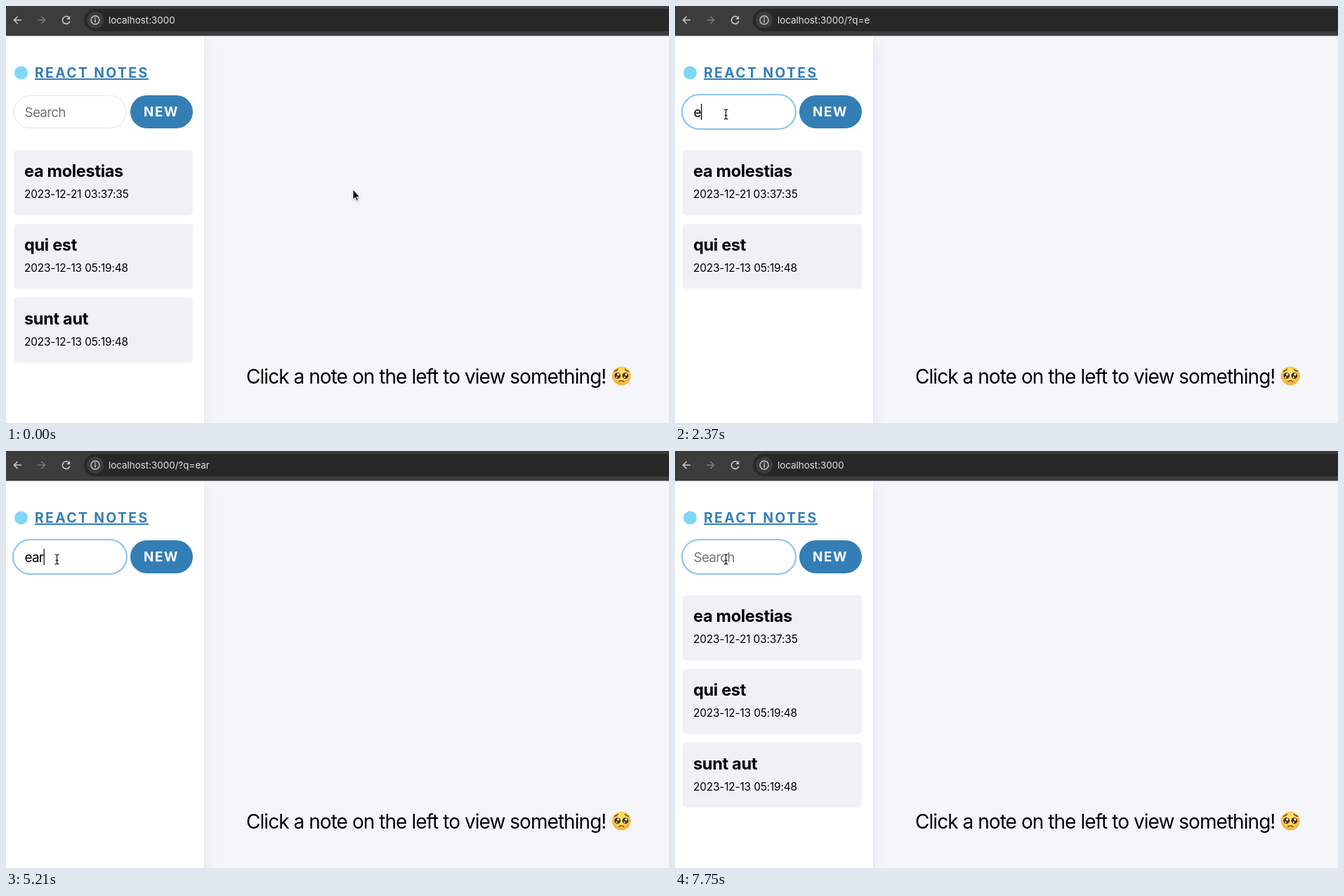
Recreate the animation shown at these times as an HTML page. Size 944 by 593 pixels, loop 8000 ms.

```html
<!DOCTYPE html>
<html lang="en">
<head>
<meta charset="utf-8">
<title>React Notes</title>
<style>
html, body { margin: 0; width: 100%; height: 100%; overflow: hidden; background: #f5f6fa; }
svg { display: block; width: 944px; height: 593px; font-family: Inter, Roboto, sans-serif; }
.title { font-size: 23.6px; font-weight: 700; letter-spacing: -.35px; }
.date { font-size: 15.4px; letter-spacing: -.16px; }
.brand { font-size: 19.4px; font-weight: 700; letter-spacing: 2.35px; fill: #347eb6; }
.button { font-size: 18.8px; font-weight: 700; letter-spacing: 1.6px; fill: #fff; }
.field { font-size: 19px; letter-spacing: -.8px; }
.message { font-size: 28px; letter-spacing: -.95px; }
.icon { fill: none; stroke: #c9c9c9; stroke-width: 1.6; }
</style>
</head>
<body>
<svg viewBox="0 0 944 593">
  <defs>
    <filter id="wide" x="-20%" y="-20%" width="140%" height="140%"><feGaussianBlur stdDeviation="11"/></filter>
    <filter id="tight" x="-5%" y="-5%" width="110%" height="110%"><feGaussianBlur stdDeviation="1"/></filter>
    <filter id="soft" x="-50%" y="-50%" width="200%" height="200%"><feDropShadow dx="0" dy="1" stdDeviation=".8" flood-opacity=".35"/></filter>
    <clipPath id="page"><rect y="43" width="944" height="550"/></clipPath>
    <radialGradient id="skin" cy=".4"><stop offset=".5" stop-color="#ffdf66"/><stop offset="1" stop-color="#f3b63f"/></radialGradient>
  </defs>

  <rect width="944" height="593" fill="#f5f6fa"/>
  <g clip-path="url(#page)">
    <rect x="-40" y="51" width="322" height="600" fill="#959da5" fill-opacity=".2" filter="url(#wide)"/>
    <rect x="-40" y="45" width="322" height="600" fill="#959da5" fill-opacity=".2" filter="url(#tight)"/>
    <rect y="43" width="282" height="550" fill="#fff"/>
  </g>

  <rect width="944" height="42.5" fill="#3c3c3c"/>
  <rect x="111" y="4" width="880" height="32" rx="16" fill="#282828"/>
  <path class="icon" d="M22 20H11.5M16.5 15L11.5 20L16.5 25"/>
  <path class="icon" style="stroke:#7c7c7c" d="M45 20H55.5M50.5 15L55.5 20L50.5 25"/>
  <path class="icon" d="M89.6 16.5A5.3 5.3 0 1 0 90.8 21.5"/>
  <path fill="#c9c9c9" d="M91.2 14V19H86.2Z"/>
  <circle cx="127" cy="20" r="12" fill="#3c3c3c"/>
  <circle class="icon" cx="127" cy="20" r="6" style="stroke-width:1.4"/>
  <path class="icon" d="M127 19V23.5M127 16.3V17.9"/>
  <text id="url" x="146" y="25" font-size="13.4" fill="#e2e2e2"></text>

  <circle cx="21.5" cy="95" r="9.5" fill="#7fd8f5"/>
  <text class="brand" x="41" y="102">REACT NOTES</text>
  <rect x="41" y="103" width="162" height="2" fill="#347eb6"/>

  <rect x="11" y="127.5" width="160" height="46" rx="23" fill="#fff" stroke="#e3e4e7"/>
  <rect id="ring" x="10" y="126" width="162" height="49" rx="24.5" fill="#fff" stroke="#8dc4f1" stroke-width="2.2"/>
  <text id="field" class="field" x="26.5" y="158"></text>
  <rect id="caret" y="139" width="1.2" height="23"/>
  <rect x="177" y="127" width="89" height="47" rx="23.5" fill="#347eb6"/>
  <text class="button" x="196" y="157">NEW</text>

  <g id="list"></g>

  <text class="message" x="342" y="536.5">Click a note on the left to view something!</text>
  <g transform="translate(876.3 526)">
    <circle r="13.3" fill="url(#skin)"/>
    <g id="eyes"></g>
    <path d="M-3.5 8.2Q0 5.6 3.5 8.2M-10 -6.5Q-7 -7 -5 -9.5M10 -6.5Q7 -7 5 -9.5" fill="none" stroke="#6b3c12" stroke-width="1.3" stroke-linecap="round"/>
  </g>

  <path id="arrow" d="M0 0V14.2L3.2 11.3L5.3 16.1L7.5 15.2L5.4 10.5H9.8Z" stroke="#fff" filter="url(#soft)"/>
  <g id="beam" fill="none">
    <path id="stem" d="M-3 -7Q0 -7 0 -5Q0 -7 3 -7M0 -5V5M-3 7Q0 7 0 5Q0 7 3 7M-2 1.5H2" stroke="#fff" stroke-width="2.8"/>
    <path d="M-3 -7Q0 -7 0 -5Q0 -7 3 -7M0 -5V5M-3 7Q0 7 0 5Q0 7 3 7M-2 1.5H2" stroke="#111" stroke-width="1.2"/>
  </g>
</svg>
<script>
const LOOP = 8000;
const el = id => document.getElementById(id);
const show = (node, on) => node.setAttribute('visibility', on ? 'visible' : 'hidden');

const notes = [
  ['ea molestias', '2023-12-21 03:37:35'],
  ['qui est', '2023-12-13 05:19:48'],
  ['sunt aut', '2023-12-13 05:19:48']
];
el('list').innerHTML = notes.map(([title, date], i) => `
  <g transform="translate(11 ${205 + i * 104.75})">
    <rect width="255" height="92.8" rx="5" fill="#f0f1f5"/>
    <text class="title" x="15" y="38">${title}</text>
    <text class="date" x="15" y="68">${date}</text>
  </g>`).join('');
el('eyes').innerHTML = [-5.6, 5.6].map(x => `
  <circle cx="${x}" cy="-.3" r="4.4" fill="#4a2b13"/>
  <circle cx="${x + 1}" cy="-2" r="1.7" fill="#fff"/>
  <circle cx="${x - 1.2}" cy="1.8" r="1.1" fill="#fff"/>`).join('');

// Each track is a list of [start, value]; a value holds until the next start.
const typed = [[0, ''], [2220, 'e'], [3270, 'ea'], [4920, 'ear'], [6860, 'ea'], [7310, 'e'], [7600, '']];
const query = [[0, ''], [2370, 'e'], [3420, 'ea'], [5070, 'ear'], [6860, 'ea'], [7310, 'e'], [7600, '']];
const blink = [[0, 0], [2220, 1], [2820, 0], [3270, 1], [3870, 0], [4320, 1], [5660, 0], [6110, 1], [6560, 0], [6860, 1], [7600, 0]];
const mouse = [[0, [494, 261]], [600, [516, 267]], [745, [412, 246]], [890, [252, 206]], [1035, [118, 160]],
  [1180, [72, 150]], [1630, [73.5, 154]], [1780, [72.5, 154]]];
const caretX = [26, 37, 46.6, 53.6];
const counts = [3, 2, 1, 0];
const at = (track, t) => track.filter(([start]) => start <= t).pop()[1];

function draw(t) {
  const text = at(typed, t), q = at(query, t), [x, y] = at(mouse, t);
  el('url').textContent = 'localhost:3000' + (q && '/?q=' + q);
  el('field').textContent = text || 'Search';
  el('field').setAttribute('fill', text ? '#000' : '#757575');
  el('caret').setAttribute('x', caretX[text.length]);
  show(el('caret'), at(blink, t));
  show(el('ring'), t >= 1780);
  [...el('list').children].forEach((card, i) => show(card, i < counts[q.length]));
  const overField = t >= 1180;
  for (const id of ['arrow', 'beam']) {
    el(id).setAttribute('transform', `translate(${x} ${y})`);
    show(el(id), (id === 'beam') === overField);
  }
}

function tick() {
  draw(performance.now() % LOOP);
  requestAnimationFrame(tick);
}
tick();
</script>
</body>
</html>
```
